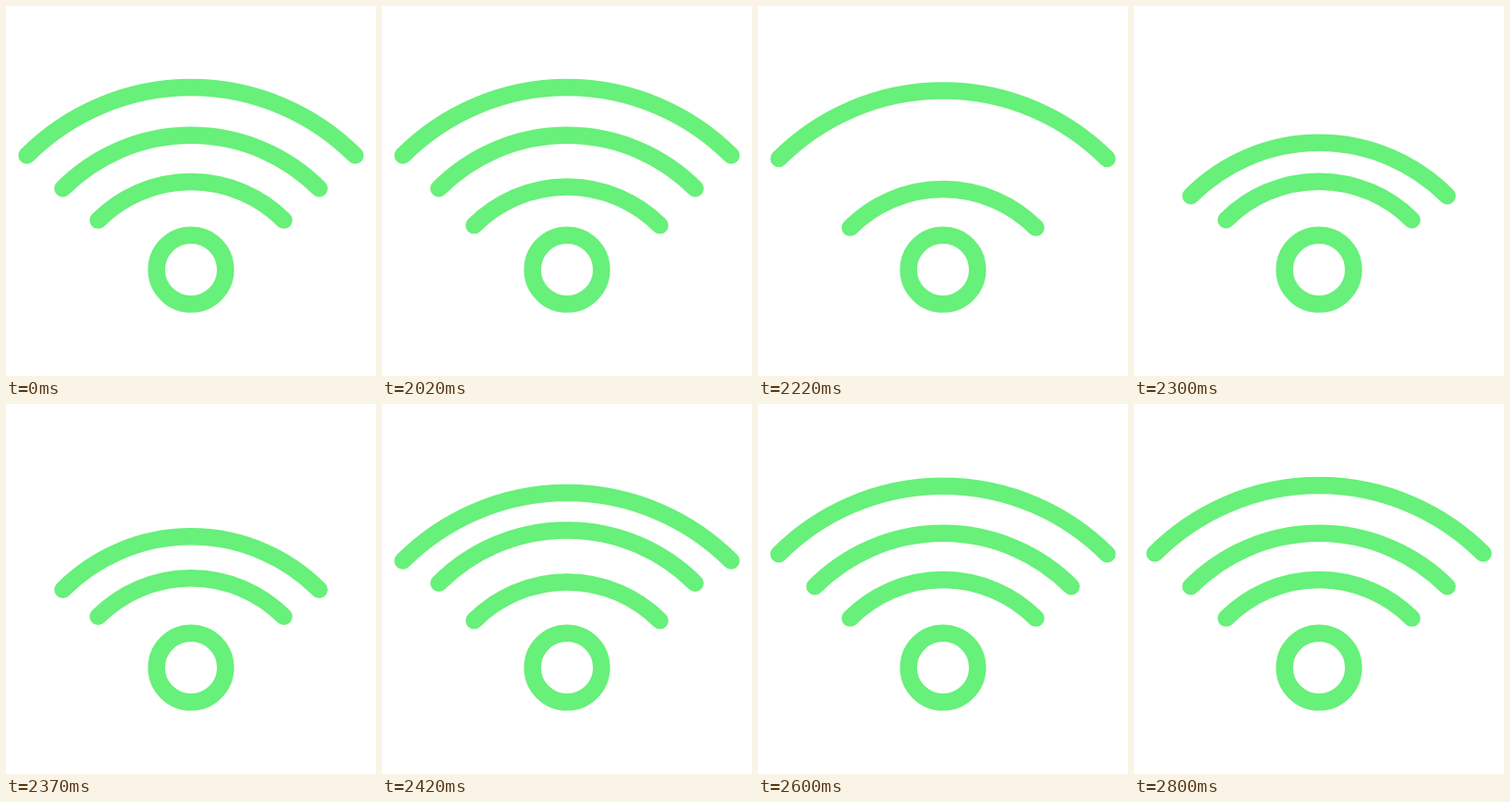
Recreate the animation shown at these times as an HTML page. Size 400 by 400 pixels, loop 2.82 s.

```html
<!DOCTYPE html>
<html lang="en">
<head>
<meta charset="utf-8">
<title>Signal</title>
<style>
  html, body { margin: 0; width: 100%; height: 100%; overflow: hidden; background: #fff; }
  svg { display: block; width: 100vw; height: 100vh; }
</style>
</head>
<body>
<svg viewBox="0 0 400 400" fill="none" stroke="#67f07a" stroke-width="18.5" stroke-linecap="round">
  <circle cx="200" cy="285" r="37.3"/>
</svg>
<script>
const LOOP = 2820, FIRST = 2020, STEP = 25;
const HIDE = 60, SHOW = 160;

// Quarter arcs: radius, top of the curve, start of the bounce
const ARCS = [
  { r: 142, top: 190, start: 2009 },
  { r: 196, top: 139.8, start: 2108 },
  { r: 251, top: 88, start: 2213 }
];

// Vertical offset at each time after the start
const BOUNCE = [[0, 0], [16, 8], [215, 8], [328, -4], [411, 2.5], [490, 0], [535, -1], [580, 0]];

const svg = document.querySelector('svg');
for (const arc of ARCS) {
  const x = arc.r * Math.SQRT1_2;
  const y = arc.top + arc.r - x;
  arc.el = document.createElementNS(svg.namespaceURI, 'path');
  arc.el.setAttribute('d', `M${200 - x} ${y}A${arc.r} ${arc.r} 0 0 1 ${200 + x} ${y}`);
  svg.append(arc.el);
}

function offset(p) {
  const i = BOUNCE.findIndex(([time]) => time > p);
  if (i < 1) return 0;
  const [t0, y0] = BOUNCE[i - 1];
  const [t1, y1] = BOUNCE[i];
  const u = (p - t0) / (t1 - t0);
  const eased = i === 1 ? u : (1 - Math.cos(Math.PI * u)) / 2;
  return y0 + (y1 - y0) * eased;
}

function draw(time) {
  const t = time % LOOP;
  // The bounce runs at 40 steps a second
  const held = t < FIRST - 1 ? 0 : FIRST + Math.floor((t - FIRST + 1) / STEP) * STEP;
  for (const { el, start } of ARCS) {
    const p = held - start;
    el.setAttribute('transform', `translate(0 ${offset(p).toFixed(2)})`);
    el.setAttribute('visibility', p >= HIDE && p < SHOW ? 'hidden' : 'visible');
  }
}

const begin = performance.now();
function tick() {
  draw(performance.now() - begin);
  requestAnimationFrame(tick);
}
tick();
</script>
</body>
</html>
```
